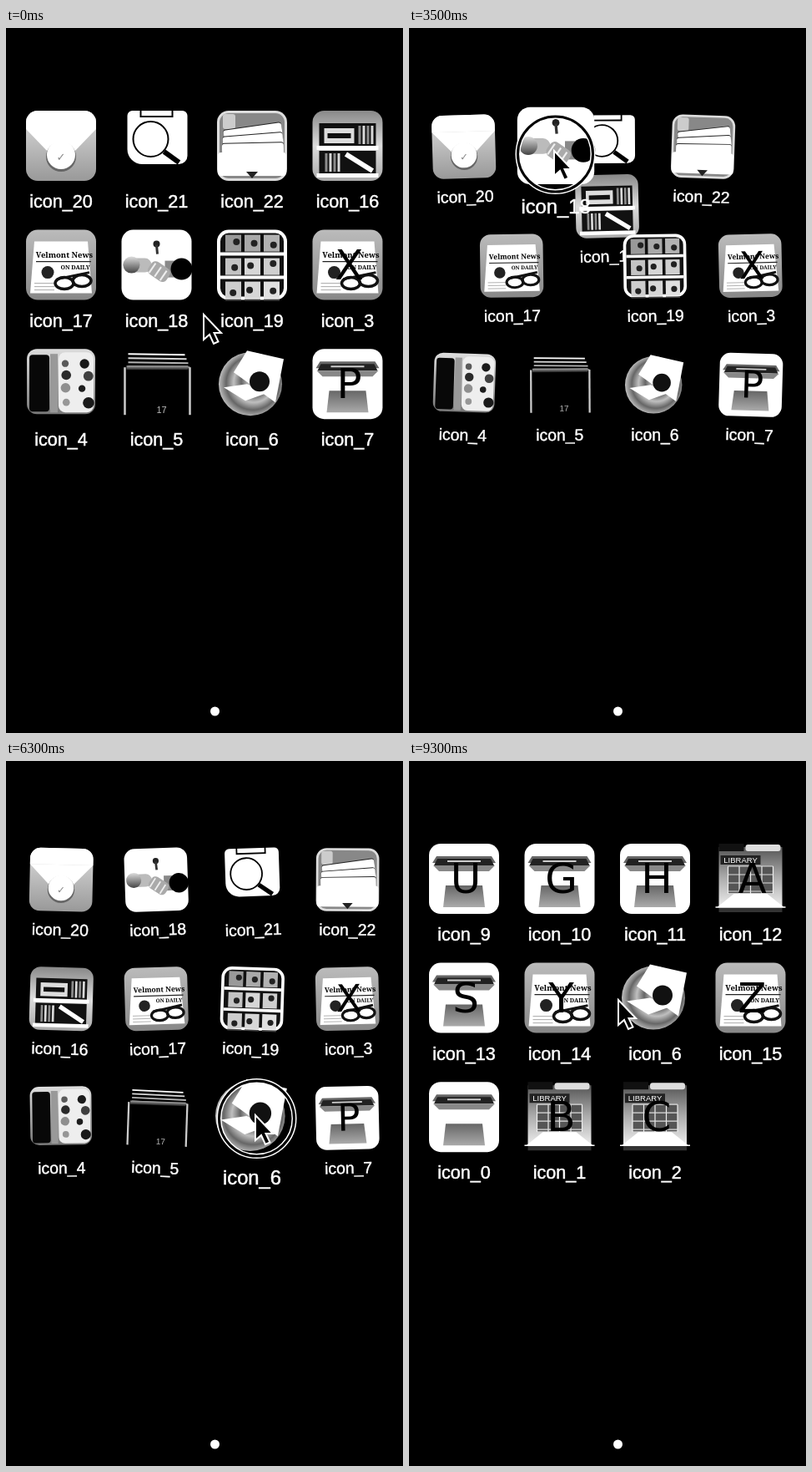
These frames come from a looping animation (476 by 844 pixels, 9.4 s). An HTML page with a canvas:

```html
<!DOCTYPE html>
<html lang="en">
<head>
<meta charset="utf-8">
<title>Icon grid</title>
<style>
html, body { margin: 0; width: 100%; height: 100%; overflow: hidden; background: #000; }
canvas { display: block; }
</style>
</head>
<body>
<canvas width="476" height="844"></canvas>
<script>
const g = document.querySelector('canvas').getContext('2d');
const LOOP = 9400, STEP = 100, WIDTH = 476;
const SANS = '"Liberation Sans", Arial, sans-serif', SERIF = '"Noto Serif", serif';

// --- drawing helpers ---
function box(x, y, w, h, fill, r = 0) {
  g.fillStyle = fill;
  g.beginPath();
  g.roundRect(x, y, w, h, r);
  g.fill();
}
function poly(fill, ...pts) {
  g.fillStyle = fill;
  g.beginPath();
  pts.forEach(p => g.lineTo(...p));
  g.closePath();
  g.fill();
}
// symmetric trapezoid between two heights, given by half widths
function trap(fill, y0, w0, y1, w1) {
  poly(fill, [-w0, y0], [w0, y0], [w1, y1], [-w1, y1]);
}
function line(color, width, x0, y0, x1, y1) {
  g.strokeStyle = color;
  g.lineWidth = width;
  g.beginPath();
  g.moveTo(x0, y0);
  g.lineTo(x1, y1);
  g.stroke();
}
function disc(x, y, r, fill) {
  g.fillStyle = fill;
  g.beginPath();
  g.arc(x, y, r, 0, 7);
  g.fill();
}
function ring(x, y, r, color, width, ry = r) {
  g.strokeStyle = color;
  g.lineWidth = width;
  g.beginPath();
  g.ellipse(x, y, r, ry, 0, 0, 7);
  g.stroke();
}
function text(s, x, y, font, fill = '#000') {
  g.font = font;
  g.fillStyle = fill;
  g.textAlign = 'center';
  g.fillText(s, x, y);
}
function fade(y0, y1, ...colors) {
  const grad = g.createLinearGradient(0, y0, 0, y1);
  colors.forEach((c, i) => grad.addColorStop(i / (colors.length - 1), c));
  return grad;
}
function at(x, y, angle, paint) {
  g.save();
  g.translate(x, y);
  g.rotate(angle);
  paint();
  g.restore();
}
function random(seed) {
  return () => (seed = seed * 16807 % 2147483647) / 2147483647;
}
const repeat = (n, fn) => { for (let i = 0; i < n; i++) fn(i); };
const grey = v => `rgb(${v * 255} ${v * 255} ${v * 255})`;
const tile = fill => box(-42, -42, 84, 84, fill, 14);

// --- icon art, centred on 0,0 in an 84px square ---
function envelope() {
  tile(fade(-20, 42, '#ccc', '#999'));
  box(-42, -42, 84, 22, '#fff', [14, 14, 0, 0]);
  trap('#fff', -20, 42, 8, 15);
  disc(0, 13, 18, '#666');
  disc(0, 11, 17, '#fff');
  text('✓', 0, 18, '13px "DejaVu Sans", sans-serif', '#888');
}
function search() {
  box(-35, -42, 72, 64, '#fff', [6, 6, 10, 18]);
  g.strokeStyle = '#000';
  g.lineWidth = 2;
  g.strokeRect(-19, -46, 38, 11);
  ring(-7, -8, 21, '#000', 2);
  line('#000', 6, 9, 7, 27, 20);
}
function files() {
  tile('#ddd');
  box(-39, -39, 78, 78, '#888', 11);
  box(-35, -38, 15, 18, '#ccc', 3);
  repeat(3, i => at(0, -16 + i * 10, -.14 + i * .06, () => {
    box(-34 - i, -8, 70 + i * 2, 26, '#222', 3);
    box(-34 - i, -7, 70 + i * 2, 26, '#fff', 3);
  }));
  box(-41, 8, 82, 28, '#fff', 4);
  trap('#222', 31, 7, 39, 0);
}
function shelf() {
  tile(fade(-42, 42, '#888', '#ddd', '#aaa'));
  repeat(2, row => {
    const y = -27 + row * 33;
    box(-34, y, 68, 28, '#111');
    box(-37, y + 27, 74, 5, '#fff');
    repeat(4, i => box(row ? -27 + i * 5 : 13 + i * 5, y + 3, 3, 22, grey(.55 + i % 2 * .3)));
  });
  box(-28, -21, 36, 18, '#ddd');
  box(-24, -15, 28, 6, '#111');
  line('#fff', 6, -2, 10, 30, 30);
}
function news() {
  tile(fade(-42, 42, '#bbb', '#888'));
  trap('#fff', -28, 32, 34, 37);
  text('Velmont News', 4, -9, 'bold 9.5px ' + SERIF);
  line('#222', 1.2, -30, -4, 36, -4);
  disc(-16, 9, 7.5, '#222');
  text('ON DAILY', 17, 5, 'bold 7px ' + SERIF);
  repeat(3, i => line('#aaa', 1, -32, 22 + i * 4, -8, 22 + i * 4));
  repeat(2, i => ring(4 + i * 21, 22 - i * 3, 11, '#111', 3.5, 7));
  line('#111', 3, -5, 17, 34, 9);
}
function hands() {
  tile('#fff');
  box(-40, -8, 34, 17, '#bbb', 8);
  disc(-30, 0, 10, fade(-10, 10, '#ddd', '#444'));
  box(10, -5, 14, 20, '#888');
  at(3, 8, .6, () => {
    box(-13, -9, 26, 18, '#aaa', 6);
    repeat(3, i => line('#eee', 2, -9 + i * 8, -6, -9 + i * 8, 8));
  });
  disc(30, 5, 13, '#000');
  disc(0, -25, 4, '#222');
  line('#333', 3, 0, -24, 1, -13);
}
function magazines() {
  const rnd = random(7);
  tile('#fff');
  box(-38, -38, 76, 76, '#111', 10);
  repeat(9, i => {
    const x = -32 + i % 3 * 23, y = -36 + (i / 3 | 0) * 28;
    box(x, y, 19, 20, grey(.6 + rnd() * .3));
    disc(x + 5 + rnd() * 9, y + 6 + rnd() * 8, 4, '#222');
    box(x, y + 21, 19, 2, '#444');
  });
  repeat(2, i => box(-38, -15 + i * 28, 76, 4, '#fff'));
}
function closet() {
  const rnd = random(12);
  box(-41, -42, 82, 78, fade(-42, 36, '#ddd', '#777'), 12);
  box(-38, -35, 24, 68, '#080808', 4);
  box(-13, -36, 9, 70, '#999');
  box(-3, -38, 42, 72, '#eee', 8);
  repeat(8, i => disc(5 + i % 2 * 20 + rnd() * 8, -28 + (i >> 1) * 16 + rnd() * 6, 4 + rnd() * 3, grey(rnd() * .7)));
}
function wallet() {
  repeat(4, i => line(grey(1 - i * .15), 2, -34, -36 + i * 5, 34 + i * 2, -35 + i * 5));
  box(-36, -22, 74, 5, fade(-22, -17, '#aaa', '#222'));
  repeat(2, i => line('#ccc', 2.5, -38 + i * 78, -20, -38 + i * 78, 37));
  text('17', 6, 35, '11px ' + SANS, '#bbb');
}
function shield() {
  tile('#000');
  const shade = g.createRadialGradient(4, -4, 8, 0, 0, 40);
  repeat(5, i => shade.addColorStop(i / 4, grey(i % 2 ? .4 : .75)));
  disc(-2, 0, 38, shade);
  poly('#fff', [-6, -40], [38, -30], [28, 22], [-22, -14]);
  poly('#fff', [-34, 4], [-6, 0], [20, 10], [-8, 20]);
  disc(9, -3, 12, '#111');
}
function bin() {
  tile('#fff');
  trap('#666', -27, 33, -19, 38);
  trap('#222', -24, 32, -16, 36);
  trap('#888', -16, 37, -9, 30);
  line('#ccc', 2, -20, -21, 20, -21);
  trap(fade(8, 34, '#666', '#aaa'), 8, 22, 34, 25);
}
function library() {
  box(-38, -38, 76, 72, fade(-38, 34, '#555', '#aaa', '#eee'));
  box(-38, -42, 30, 9, '#111');
  box(-6, -41, 42, 8, '#ddd', 3);
  box(-36, -28, 48, 11, '#222');
  text('LIBRARY', -12, -19, '9.5px ' + SANS, '#fff');
  box(-27, -15, 54, 32, '#555');
  repeat(5, i => line('#eee', 1.2, -27 + i * 13.5, -15, -27 + i * 13.5, 18));
  repeat(4, i => line('#ddd', 1.2, -27, -15 + i * 10, 27, -15 + i * 10));
  box(-38, 33, 76, 7, '#333');
  trap('#fff', 18, 20, 34, 40);
  line('#fff', 1.5, -42, 34, 42, 34);
}

const LETTERS = ' BCX   PTUGHASYZ';
const SPECIAL = { 4: closet, 5: wallet, 6: shield, 16: shelf, 18: hands, 19: magazines, 20: envelope, 21: search, 22: files };
function artOf(id) {
  if ('XYZ'.includes(LETTERS[id]) || id === 17) return news;
  if ('ABC'.includes(LETTERS[id])) return library;
  return SPECIAL[id] || bin;
}

function drawIcon(id, [x, y], scale, angle = 0) {
  const pivot = 11, label = 'icon_' + id;
  at(x, y + pivot, angle, () => {
    g.scale(scale, scale);
    g.translate(0, -pivot);
    artOf(id)();
    text(LETTERS[id] || '', 2, 17, '50px "DejaVu Sans", sans-serif');
    text(label, 0, 74, '21.6px ' + SANS, '#fff');
    g.strokeStyle = '#fff';
    g.lineWidth = .5;
    g.strokeText(label, 0, 74);
  });
}

// --- motion ---
function ramp(t, from, to) {
  const k = Math.min(1, Math.max(0, (t - from) / (to - from)));
  return k * k * (3 - 2 * k);
}
// rises at one time and falls back at another
const pulse = (t, up, down, time = 250) => ramp(t, up, up + time) - ramp(t, down, down + time);
const blend = (a, b, k) => a.map((v, i) => v + (b[i] - v) * k);
const shift = ([x, y], dx, dy = 0) => [x + dx, y + dy];
const range = (a, b) => Array.from({ length: b - a + 1 }, (_, i) => a + i);
const slot = i => i < 0 ? shift(slot(11), -WIDTH) : [66 + i % 4 * 114.5, 141 + (i >> 2) * 142.6];

const PAGE1 = [...range(20, 22), ...range(16, 19), ...range(3, 7)];
const PAGE2 = [...range(8, 15), ...range(0, 2)];
// start, end, destination
const MOVES = [
  [0, 1200, 180, 282], [2300, 2800, 126, 198], [2800, 3300, 174, 147],
  [4400, 5000, 299, 424], [6400, 6800, 446, 444], [7400, 8100, 251, 286]
];
const cursor = t => MOVES.reduce((p, [from, to, ...dest]) => blend(p, dest, ramp(t, from, to)), [237, 343]);

// an icon leaves its slot, follows the cursor and lands in another slot
function carried(t, from, to, grab, drop, dx, dy) {
  const held = blend(slot(from), shift(cursor(t), dx, dy), ramp(t, grab, grab + 400));
  return blend(held, slot(to), ramp(t, drop, drop + 200));
}
const wiggle = (t, i) => t > 2900 && t < 4500 || t > 5900 ? .035 * Math.sin(t / 38 + i * 2) : 0;
const shrink = (t, restore = 4350) => pulse(t, 1950, restore) + ramp(t, 5800, 6000);

function drawPage1(t, dx) {
  const moved = ramp(t, 3300, 3700);
  PAGE1.forEach((id, i) => {
    if (id === 6 || id === 18) return;
    const displaced = i > 0 && i < 5;
    const edit = shrink(t, displaced ? 4050 : 4350);
    const place = blend(slot(i), slot(i + displaced), moved);
    drawIcon(id, shift(place, dx), 1 - .1 * edit, wiggle(t, i) * edit);
  });
  const edit = t > 4700 ? shrink(t) : 0;
  const scale = 1 + .1 * pulse(t, 1950, 4100, 200) - .1 * edit;
  drawIcon(18, shift(carried(t, 5, 1, 2300, 4100, 2, -5), dx), scale, wiggle(t, 1) * edit);
}
function drawPage2(t, dx) {
  const moved = ramp(t, 7850, 8200);
  PAGE2.forEach((id, i) => {
    const place = blend(slot(i), slot(i < 7 ? i - 1 : i), moved);
    drawIcon(id, shift(place, dx), 1 - .1 * pulse(t, 7300, 8700));
  });
}
function drawPointer(t) {
  const [x, y] = cursor(t);
  at(x, y, 0, () => {
    g.globalAlpha = t < 4200 ? ramp(t, 1200, 1500) : pulse(t, 5000, 8450, 300);
    ring(1.5, 4, 45, '#fff', 6);
    ring(1.5, 4, 45, '#000', 3);
    g.globalAlpha = 1;
    poly('#000', [0, 0], [0, 30], [7, 24], [12, 35], [17.5, 32.5], [12.5, 22], [21, 22]);
    g.strokeStyle = '#fff';
    g.lineWidth = 2;
    g.stroke();
  });
}

function draw(now) {
  const t = Math.floor(now % LOOP / STEP) * STEP;
  const scroll = ramp(t, 6750, 7100) * WIDTH;
  box(0, 0, WIDTH, 844, '#000');
  if (t < 7100) drawPage1(t, -scroll);
  if (t > 6700) drawPage2(t, WIDTH - scroll);
  const lag = -198 * pulse(t, 6800, 7100, 300);
  const size = t < 5000 ? 1 - .1 * shrink(t) : 1 + .1 * pulse(t, 5750, 8600, 200);
  drawIcon(6, shift(carried(t, 10, 6, 6400, 8600, 1, -9), lag), size);
  disc(250.5, 818, 5.5, '#fff');
  drawPointer(t);
}

const start = performance.now();
(function tick() {
  draw(performance.now() - start);
  requestAnimationFrame(tick);
})();
</script>
</body>
</html>
```
